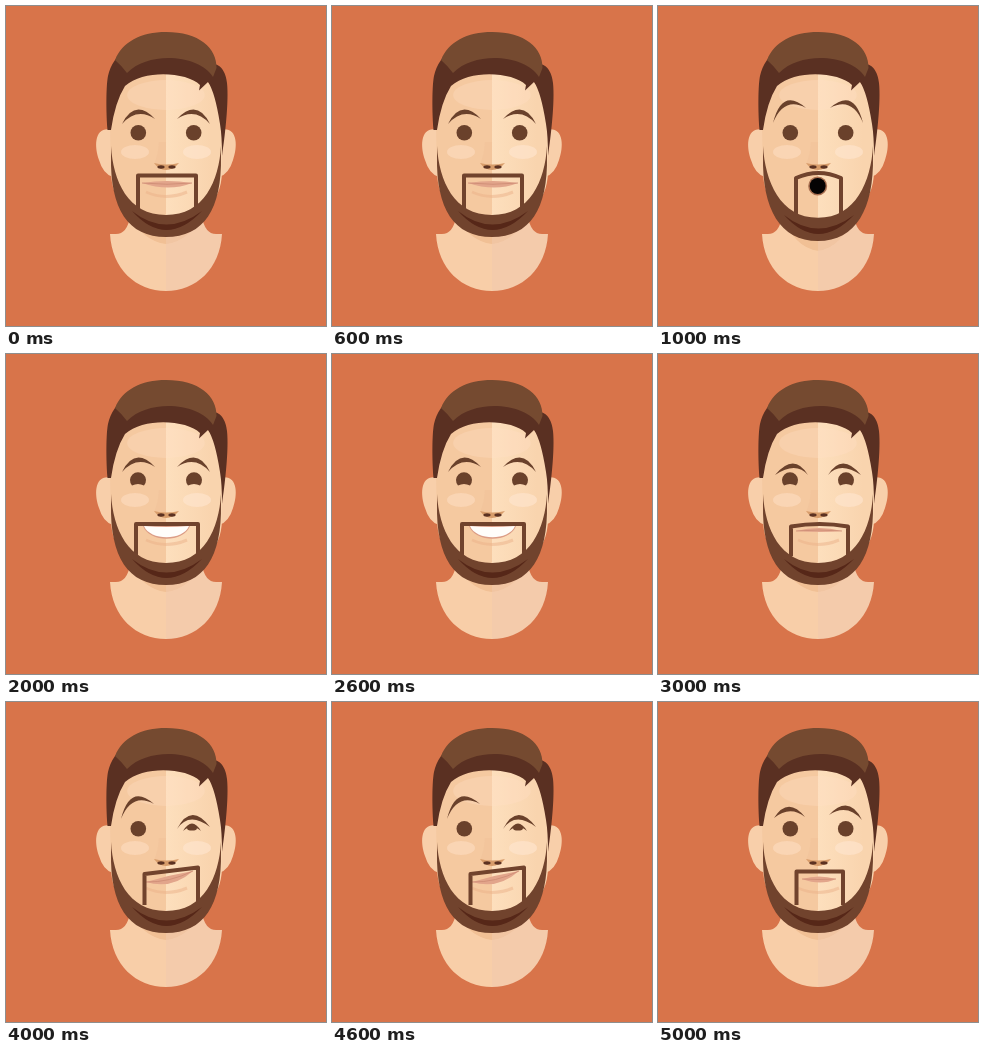
These frames come from a looping animation (320 by 320 pixels, 6 s). An HTML page with a canvas:

```html
<!DOCTYPE html>
<html lang="en">
<head>
<meta charset="utf-8">
<title>Bearded face moods</title>
<style>
html, body { margin: 0; width: 100%; height: 100%; overflow: hidden; background: #d8744a; }
canvas { display: block; width: 100vmin; height: 100vmin; }
</style>
</head>
<body>
<canvas id="stage" width="320" height="320"></canvas>
<script>
const canvas = document.getElementById('stage');
const ctx = canvas.getContext('2d');
const ratio = window.devicePixelRatio || 1;
canvas.width = canvas.height = 320 * ratio;
ctx.scale(ratio, ratio);

const STEP = 1000;
const HAIR = '#754a30', DARK = '#5a3022', BEARD = '#71432d', BROW = '#6a412b';

// brow: outer end, control, inner end; right brows are mirrored about x = 160
// box: left, top left, right, top right, rise of the moustache, lower end
const CALM = [116, 118, 129, 92, 149, 113];
const ANGRY = [117, 121, 136, 98, 150, 121];
const HIGH = [115, 117, 124, 81, 148, 102];
const WINK = [116, 125, 135, 100, 149, 127];
const moods = [
  { brows: [CALM, CALM], eyes: ['open', 'open'], box: [132, 169.5, 190, 169.5, 0, 203], mouth: 'lips', lips: [136, 177, 186, 177, 173, 186], drop: 0 },
  { brows: [HIGH, HIGH], eyes: ['open', 'open'], box: [138, 172, 183, 172, -10, 208], mouth: 'round', drop: 4 },
  { brows: [CALM, CALM], eyes: ['smile', 'smile'], box: [130, 170, 192, 170, 0, 202], mouth: 'grin', drop: 0 },
  { brows: [ANGRY, ANGRY], eyes: ['smile', 'smile'], box: [133, 172.5, 190, 172.5, -5, 202], mouth: 'lips', lips: [138, 177, 184, 177, 171, 179], drop: 0 },
  { brows: [HIGH, WINK], eyes: ['open', 'wink'], box: [138.5, 172, 192, 165.5, 0, 203], mouth: 'lips', lips: [140, 180, 187, 169, 173, 188], drop: 0 },
  { brows: [[116, 116, 130, 94, 147, 115], CALM], eyes: ['open', 'open'], box: [138.5, 169.5, 185, 169.5, 0, 203], mouth: 'lips', lips: [144, 177, 178, 177, 172, 184], drop: 0 }
];

function fill(d, color) {
  ctx.fillStyle = color;
  ctx.fill(new Path2D(d));
}

function line(d, color, width) {
  ctx.strokeStyle = color;
  ctx.lineWidth = width;
  ctx.lineJoin = 'round';
  ctx.stroke(new Path2D(d));
}

function oval(x, y, rx, ry, color) {
  ctx.fillStyle = color;
  ctx.beginPath();
  ctx.ellipse(x, y, rx, ry, 0, 0, Math.PI * 2);
  ctx.fill();
}

function halves(d, left, right) {
  ctx.save();
  ctx.clip(new Path2D(d));
  ctx.fillStyle = left;
  ctx.fillRect(0, 0, 160, 320);
  ctx.fillStyle = right;
  ctx.fillRect(160, 0, 160, 320);
  ctx.restore();
}

function mirrored(draw) {
  ctx.save();
  ctx.translate(320, 0);
  ctx.scale(-1, 1);
  draw();
  ctx.restore();
}

function body(drop) {
  halves('M124 195V211Q121 228 110 228H104C106 263 130 285 160 285S214 263 216 228H210Q199 228 196 211V195Z', '#f8cea8', '#f4cbab');
  const low = 238 + drop * 1.7;
  halves(`M124 208Q136 ${low - 3} 160 ${low}Q184 ${low - 3} 196 208Z`, '#f1c095', '#f1c5a2');
}

function ear() {
  fill('M107 124C88 119 88 140 93 154Q97 168 107 171Z', '#f8cfaa');
}

function head() {
  ear();
  mirrored(ear);
  const light = ctx.createLinearGradient(160, 0, 205, 0);
  light.addColorStop(0, '#fddfbd');
  light.addColorStop(1, '#f9d4ae');
  halves('M104 120C104 88 115 62 160 62S216 88 216 120V165C216 200 190 216 160 217S105 200 105 165Z', '#f5c9a0', light);
  oval(160, 89, 39, 15, 'rgba(255,222,200,.3)');
  oval(129, 146, 14, 7, 'rgba(255,226,200,.5)');
  oval(191, 146, 14, 7, 'rgba(255,230,208,.6)');
}

function hair() {
  fill('M101.5 124C100 105 100 80 102 70Q104 61 109 54C125 36 195 34 209 58Q219 61 221 77C223 95 219 130 216 150Q216 130 214 118Q209 86 202 76L193 84.5L194 79C181 66 138 63 119 80Q109 96 105 124Z', DARK);
  fill('M109 54C116 36 135 26 160 26C193 26 211 42 210.5 62L207 71C194 49 143 44 121 67Q116 60 109 54Z', HAIR);
}

function beard(drop) {
  const inner = 209 + drop * .7, outer = 231 + drop, fold = 212 + drop;
  fill(`M105 122V140C107 175 122 ${inner} 160 ${inner}S213 175 215 140V150C216 203 198 ${outer} 160 ${outer}S104 203 105 150Z`, BEARD);
  fill(`M126 ${fold - 7}Q160 ${fold + 20} 196 ${fold - 7}Q160 ${fold + 31} 126 ${fold - 7}Z`, '#562718');
}

function brow([x, y, cx, cy, ex, ey]) {
  fill(`M${x} ${y}Q${cx} ${cy} ${ex} ${ey}Q${cx + 2} ${cy + 9} ${x} ${y}Z`, BROW);
}

function eye(kind) {
  if (kind === 'open') {
    oval(132.3, 126.7, 7.8, 7.8, BROW);
  } else if (kind === 'smile') {
    fill('M126 131.5A8 8 0 1 1 138 131.5Q132 128.5 126 131.5Z', BROW);
  } else {
    fill('M125 129Q134 114 143 129Q134 121 125 129Z', BROW);
    oval(134, 126, 5, 2.6, BROW);
  }
}

function nose() {
  fill('M153 136Q152 150 148 158Q154 164 160 164V136Z', 'rgba(240,188,149,.3)');
  fill('M148 157Q153 164 160 164Q167 164 173 157Q160 160 148 157Z', '#d79c6a');
  oval(155, 161, 3.6, 1.7, '#5c3222');
  oval(166, 161, 3.6, 1.7, '#5c3222');
}

function moustache([x, y, ex, ey, rise, end]) {
  const cy = (y + ey) / 2 + rise;
  line(`M${x} ${end}V${y}Q${(x + ex) / 2} ${cy} ${ex} ${ey}V${end}`, BEARD, 4);
}

function mouth(mood) {
  if (mood.mouth === 'round') {
    oval(159.7, 180, 9.5, 9.5, '#a96f50');
    oval(159.7, 180, 8, 8, '#050303');
    return;
  }
  line('M140 186Q160 195 181 186', 'rgba(236,178,138,.5)', 3);
  if (mood.mouth === 'grin') {
    fill('M137 172H184C178 189 143 189 137 172Z', '#dc9d86');
    fill('M138 172Q160 174 183 172C177 187 144 187 138 172Z', '#fffdfa');
    return;
  }
  const [x, y, ex, ey, top, low] = mood.lips;
  const mx = (x + ex) / 2;
  fill(`M${x} ${y}Q${mx} ${top} ${ex} ${ey}Q${mx + 2} ${low} ${x} ${y}Z`, '#e2a58b');
  line(`M${x} ${y}Q${mx} ${(top + low) / 2} ${ex} ${ey}`, '#cd8b74', .8);
}

function draw(mood) {
  ctx.fillStyle = '#d8744a';
  ctx.fillRect(0, 0, 320, 320);
  body(mood.drop);
  head();
  hair();
  beard(mood.drop);
  brow(mood.brows[0]);
  eye(mood.eyes[0]);
  mirrored(() => {
    brow(mood.brows[1]);
    eye(mood.eyes[1]);
  });
  nose();
  mouth(mood);
  moustache(mood.box);
}

function tick() {
  draw(moods[Math.floor(performance.now() / STEP) % moods.length]);
  requestAnimationFrame(tick);
}
tick();
</script>
</body>
</html>
```
